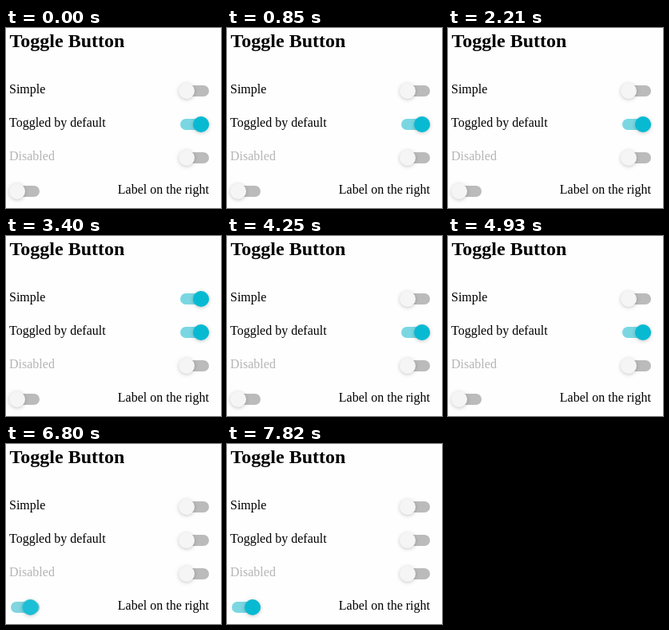
Write an HTML page that moves like this. It is 269 px wide and 226 px high and loops after 7990 ms.

```html
<!DOCTYPE html>
<html lang="en">
<head>
<meta charset="utf-8">
<title>Toggle Button</title>
<style>
  html, body { margin: 0; width: 100%; height: 100%; overflow: hidden; background: #fefefe; }
  #stage { position: relative; width: 269px; height: 226px; overflow: hidden;
    font: 16px/18px "Liberation Serif", "Times New Roman", serif; color: #000; }
  h1 { position: absolute; left: 4.5px; top: 3px; margin: 0; font-size: 24px; line-height: 27px; white-space: nowrap; }
  .row { position: absolute; left: 4px; width: 250px; height: 24px; }
  .label { position: absolute; left: 0; top: 0; white-space: nowrap; }
  .toggle { position: absolute; right: 0; top: 0; width: 38px; height: 24px; }
  .flip .label { left: auto; right: 0; }
  .flip .toggle { right: auto; left: 0; }
  .disabled .label { color: #b5b5b5; }
  .track { position: absolute; left: 2px; top: 4px; width: 36px; height: 14px; border-radius: 7px; }
  .thumb { position: absolute; left: 0; top: 1px; width: 20px; height: 20px; border-radius: 50%;
    box-shadow: 0 1px 6px rgba(0,0,0,.12), 0 1px 4px rgba(0,0,0,.12); }
</style>
</head>
<body>
<div id="stage"><h1>Toggle Button</h1></div>
<script>
const LOOP = 7990, STEP = 170, SLIDE = 450;
const EASE = 'cubic-bezier(.23, 1, .32, 1)';

// flips: times at which the switch changes state
const rows = [
  { text: 'Simple', on: false, flips: [2720, 3740] },
  { text: 'Toggled by default', on: true, flips: [4930] },
  { text: 'Disabled', on: false, flips: [], style: 'disabled' },
  { text: 'Label on the right', on: false, flips: [6630], style: 'flip' }
];

const trackLook = on => ({ backgroundColor: on ? '#7ad7e2' : '#bbbbbb' });
const thumbLook = on => ({
  backgroundColor: on ? '#07bad2' : '#f5f5f5',
  transform: `translateX(${on ? 18 : 0}px)`
});

const stage = document.getElementById('stage');
const animations = [];

function add(parent, className, text = '') {
  const el = document.createElement('div');
  el.className = className;
  el.textContent = text;
  return parent.appendChild(el);
}

function schedule(el, look, { on, flips }) {
  const frames = [{ offset: 0, ...look(on) }];
  for (const time of flips) {
    frames.push({ offset: time / LOOP, easing: EASE, ...look(on) });
    on = !on;
    frames.push({ offset: (time + SLIDE) / LOOP, ...look(on) });
  }
  frames.push({ offset: 1, ...look(on) });
  const animation = el.animate(frames, { duration: LOOP, fill: 'both' });
  animation.pause();
  animations.push(animation);
}

rows.forEach((row, i) => {
  const el = add(stage, `row ${row.style || ''}`);
  el.style.top = `${68 + 42 * i}px`;
  add(el, 'label', row.text);
  const toggle = add(el, 'toggle');
  schedule(add(toggle, 'track'), trackLook, row);
  schedule(add(toggle, 'thumb'), thumbLook, row);
});

const start = performance.now();
function draw() {
  const time = (performance.now() - start) % LOOP;
  const held = Math.floor(time / STEP) * STEP;
  for (const animation of animations) animation.currentTime = held;
  requestAnimationFrame(draw);
}
draw();
</script>
</body>
</html>
```
